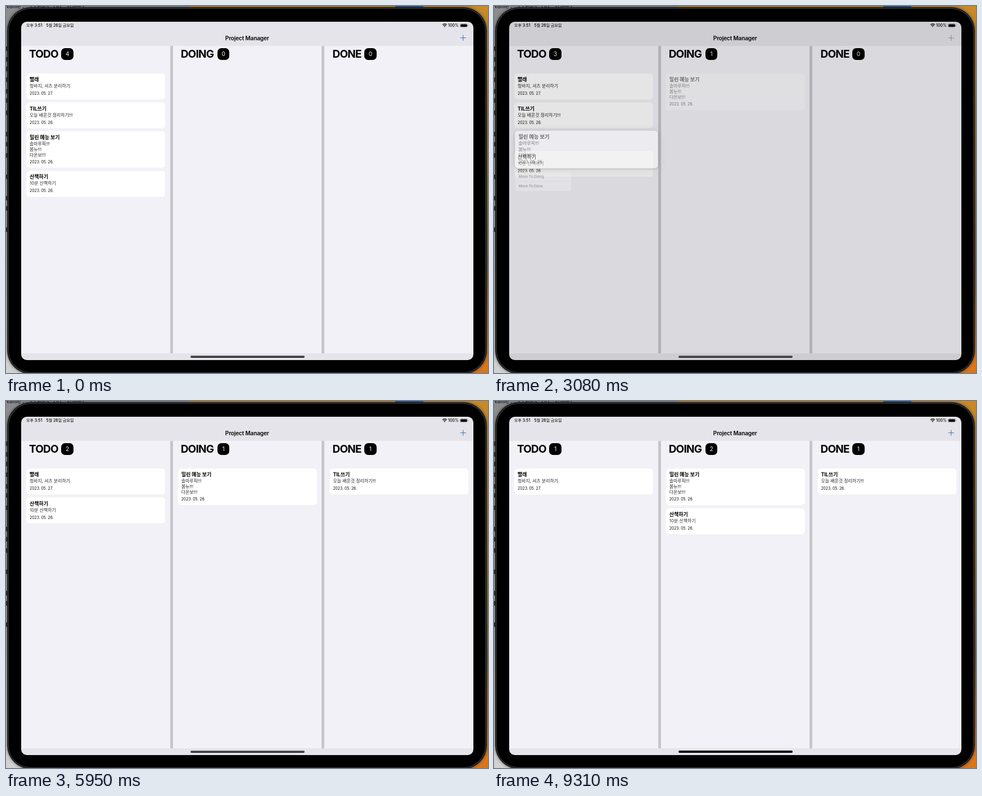
These frames come from a looping animation (857 by 653 pixels, 9.38 s). An HTML page:

```html
<!DOCTYPE html>
<html lang="ko">
<head>
<meta charset="utf-8">
<title>Project Manager</title>
<style>
html, body { margin: 0; width: 100%; height: 100%; overflow: hidden; background: #8d8c8b; }
body { font-family: Inter, "Noto Sans CJK KR", "Noto Sans CJK", sans-serif; color: #000; }
div, span, svg { position: absolute; box-sizing: border-box; white-space: pre; }
#stage { left: 0; top: 0; width: 857px; height: 653px; overflow: hidden;
  background: linear-gradient(#8b8b8d, #a8a8aa 60%, #d2d2d2); }
#wall { left: 327px; top: 0; width: 530px; height: 653px;
  background: linear-gradient(#c98a2a, #a5752c 30%, #7d5a30 70%, #d9761c 96%); }
#wall i { position: absolute; left: 365px; top: 0; width: 50px; height: 3px; background: #2c5f9e; }
#code { left: -2px; top: -8px; font: 12px/16px "Noto Sans Mono", monospace; color: #1c1c1e; }
.tick { left: 0; width: 2px; height: 8px; background: #333; }
#device { left: 2px; top: 2px; width: 853px; height: 653px; border-radius: 42px; background: #000;
  border: 1px solid #2a2b2d; box-shadow: 0 0 5px rgba(0,0,0,.5), inset 0 0 0 1px #111213, inset 0 0 0 2px #3f4042; }
#screen { left: 27px; top: 28px; width: 804px; height: 602px; border-radius: 10px; overflow: hidden; background: #e5e4ea; }
#page { left: -27px; top: -28px; width: 857px; height: 653px; }
#board, #lifted { left: 0; top: 0; }
.col { top: 71px; width: 265px; height: 547px; background: #f2f1f7; }
.bar { top: 71px; width: 5px; height: 547px; background: #c7c6cb; }
.head { top: 73.8px; font-size: 19px; line-height: 24px; font-weight: 700; letter-spacing: -.8px; }
.badge { top: 74.8px; width: 21.6px; height: 21.6px; border-radius: 7px; background: #000; color: #eee;
  font-size: 10.5px; line-height: 21.6px; text-align: center; }
.status { top: 29.5px; line-height: 10px; font-size: 7px; font-weight: 500; }
#title { left: 328.7px; top: 49.5px; width: 200px; text-align: center; font-size: 10px; line-height: 14px;
  font-weight: 600; letter-spacing: -.13px; }
.card { left: 0; top: 0; width: 247px; border-radius: 6px; background: #fff; }
.card span { left: 6px; }
.name { top: 5px; font-size: 9px; line-height: 12px; font-weight: 700; letter-spacing: -.05px; }
.note { top: 18.4px; font-size: 7.9px; line-height: 9.75px; color: #2c2c2e; }
.date { bottom: 5.6px; font-size: 6.9px; line-height: 9px; color: #111; letter-spacing: -.04px; }
#dim { left: 0; top: 0; width: 857px; height: 653px; background: #000; }
#menu { left: 0; top: 0; width: 147px; height: 51px; border-radius: 7px; overflow: hidden; transform-origin: 0 0;
  background: rgba(247, 247, 249, .86); backdrop-filter: blur(9px); }
#menu span { left: 9.5px; font-size: 9.6px; line-height: 14px; letter-spacing: -.2px; }
#menu i { position: absolute; left: 0; top: 25px; width: 147px; height: 1px; background: #d4d4d8; }
#home { left: 327.5px; top: 622.4px; width: 203px; height: 3.6px; border-radius: 2px; }
</style>
</head>
<body>
<div id="stage">
  <div id="wall"><i></i></div>
  <div id="code">Name: items on sheet</div>
  <div id="device"></div>
  <div id="screen"><div id="page">
    <div id="board"></div>
    <span class="status" style="left:36px">오후 3:51</span>
    <span class="status" style="left:71.5px">5월 26일 금요일</span>
    <span class="status" style="left:786px">100%</span>
    <svg style="left:774px;top:28px" width="52" height="14" fill="none" stroke="#000">
      <path d="M2 5.4Q6 1.6 10 5.4M3.5 7Q6 4.7 8.5 7" stroke-width="1.1"/>
      <path d="M4.7 8.2Q6 7.2 7.3 8.2L6 9.7Z" fill="#000" stroke="none"/>
      <rect x="33.4" y="3.6" width="13" height="6.2" rx="1.8" stroke="#88878b" stroke-width=".6"/>
      <rect x="34.2" y="4.4" width="11.4" height="4.6" rx="1.1" fill="#000" stroke="none"/>
      <path d="M47.4 5.7v2" stroke="#88878b" stroke-width=".9"/>
    </svg>
    <span id="title">Project Manager</span>
    <svg style="left:807px;top:51px" width="12" height="12"><path id="plus" d="M.8 5.7h10M5.8 .7v10" fill="none"/></svg>
    <div id="dim"></div>
    <div id="menu"><span style="top:5.8px">Move To Doing</span><i></i><span style="top:31.4px">Move To Done</span></div>
    <div id="lifted"></div>
    <div id="home"></div>
  </div></div>
</div>
<script>
const LOOP = 9380, STEP = 70, FADE = 280;
const $ = id => document.getElementById(id);
const clamp = v => Math.max(0, Math.min(1, v));
const mix = (a, b, p) => a + (b - a) * p;
const smooth = p => p * p * (3 - 2 * p);

const tasks = {
  wash: ['빨래', '청바지, 셔츠 분리하기', '2023. 05. 27.'],
  til: ['TIL쓰기', '오늘 배운것 정리하기!!!', '2023. 05. 26.'],
  shows: ['밀린 예능 보기', '솔마루픽!!!\n봄뉴!!!\n다온보!!!', '2023. 05. 26.'],
  walk: ['산책하기', '10분 산책하기', '2023. 05. 26.']
};
const columns = [['TODO', 27, 42, 98.3], ['DOING', 296.5, 311.7, 375.8], ['DONE', 566.2, 581.5, 637.2]];
const boards = [
  [['wash', 'til', 'shows', 'walk'], [], []],
  [['wash', 'til', 'walk'], ['shows'], []],
  [['wash', 'walk'], ['shows'], ['til']],
  [['wash'], ['shows', 'walk'], ['til']]
];
// press: touch down, open: menu springs out, rest: settled, pick: menu item chosen
const moves = [
  { task: 'shows', press: 980, open: 1650, rest: 2100, pick: 3010 },
  { task: 'til', press: 4130, open: 4635, rest: 5110, pick: 5740 },
  { task: 'walk', press: 6860, open: 7429, rest: 7910, pick: 8400 }
];

function add(parent, tag, cls, text, style) {
  const el = document.createElement(tag);
  el.className = cls;
  el.textContent = text;
  Object.assign(el.style, style);
  parent.append(el);
  return el;
}
const cardHeight = id => 35.75 + 9.75 * tasks[id][1].split('\n').length;
function makeCard(parent, id) {
  const el = add(parent, 'div', 'card', '', { height: cardHeight(id) + 'px' });
  ['name', 'note', 'date'].forEach((cls, i) => add(el, 'span', cls, tasks[id][i]));
  return el;
}

for (const y of [72, 91, 108, 127, 148, 164, 186, 224, 242, 262, 300, 338, 356, 394])
  $('device').before(add($('stage'), 'div', 'tick', '', { top: y + 'px' }));
const badges = columns.map(([name, x, textX, badgeX], i) => {
  add($('board'), 'div', 'col', '', { left: x + 'px' });
  if (i) add($('board'), 'div', 'bar', '', { left: x - 5 + 'px' });
  add($('board'), 'span', 'head', name, { left: textX - 1 + 'px' });
  return add($('board'), 'div', 'badge', '', { left: badgeX + 'px' });
});
const cards = {}, copies = {};
for (const id in tasks) {
  cards[id] = makeCard($('board'), id);
  copies[id] = makeCard($('lifted'), id);
}

function slot(board, id) {
  const col = board.findIndex(list => list.includes(id));
  let y = 120.3;
  for (const other of board[col]) {
    if (other === id) break;
    y += cardHeight(other) + 5.7;
  }
  return { col, x: 36 + 269.7 * col, y };
}

function spring(t) {
  const k = 15 * t / 1000;
  return 1 - (1 + k) * Math.exp(-k);
}

function draw(t) {
  const done = moves.filter(m => t >= m.pick).length;
  const board = boards[done], last = moves[done - 1];
  // the step on which an item is picked already shows part of the fade
  const away = last ? clamp((t - last.pick + STEP) / FADE) : 1;
  const settling = away < 1;
  const move = settling ? last : moves.find(m => t >= m.press && t < m.pick);

  badges.forEach((b, i) => b.textContent = board[i].length);
  for (const id in cards) {
    const to = slot(board, id), from = last ? slot(boards[done - 1], id) : to;
    const same = from.col === to.col;
    const y = same ? mix(from.y, to.y, smooth(away)) : to.y;
    cards[id].style.transform = `translate(${to.x}px,${y}px)`;
    cards[id].style.opacity = move && move.task === id ? (settling ? away : 0) : 1;
    copies[id].style.display = move && move.task === id ? '' : 'none';
  }

  let dim = 0, menu = 0, lift = 0, p = 0;
  if (move) {
    const home = slot(boards[moves.indexOf(move)], move.task), h = cardHeight(move.task);
    const show = settling ? 1 - away : 1;
    lift = smooth(clamp((t - move.press - STEP) / (move.open - move.press - STEP)));
    p = t >= move.rest ? 1 : t > move.open ? spring(t - move.open) : 0;
    if (settling) p = show;
    dim = .2 * (settling ? show : .06 * lift + .94 * p);
    menu = clamp(p * 1.5) * show;
    const scale = settling ? mix(1, 1.06, show) : 1 + .04 * lift + .02 * p;
    const x = home.x + 9.8 * p, style = copies[move.task].style;
    style.transform = `translate(${x}px,${home.y}px) scale(${scale})`;
    style.opacity = show;
    const grey = settling ? 0 : 1 - clamp((t - move.press - 70) / 210);
    const tone = c => Math.round(mix(255, c, grey));
    style.background = `rgb(${tone(209)},${tone(208)},${tone(213)})`;
    style.boxShadow = `0 1px 4px rgba(0,0,0,${.34 * lift}), 0 1px 20px rgba(0,0,0,${.13 * lift})`;
    const left = x + 123.5 * (1 - scale), bottom = home.y + h / 2 * (1 + scale);
    $('menu').style.transform = `translate(${left}px,${bottom + 12 * p}px) scale(${mix(.36, 1, p)})`;
  }
  $('dim').style.opacity = dim;
  $('menu').style.opacity = menu;
  const muted = p > 0;
  $('plus').setAttribute('stroke', muted ? '#85858a' : '#3f6fae');
  $('plus').setAttribute('stroke-width', muted ? .8 : 1);
  const solid = (t >= 3570 && t < 4200) || t >= 8960;
  $('home').style.background = solid ? '#000' : 'linear-gradient(#7a7a7e,#38383a 55%,#29292b)';
}

const start = performance.now();
function tick() {
  const t = (performance.now() - start) % LOOP;
  draw(Math.floor(t / STEP) * STEP);
  requestAnimationFrame(tick);
}
tick();
</script>
</body>
</html>
```
